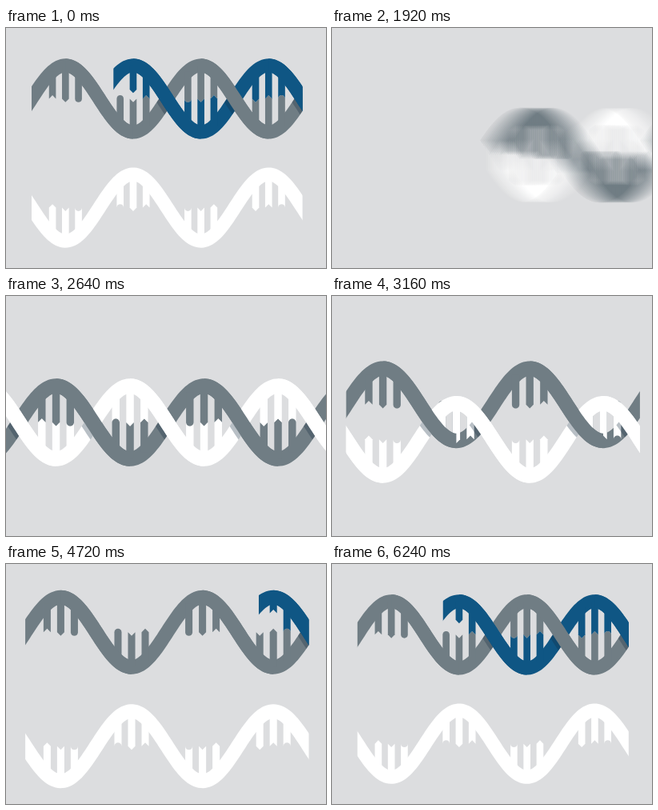
An HTML page with a canvas that plays this animation: 400x300 px, repeating every 6.28 s.

```html
<!DOCTYPE html>
<html lang="en">
<head>
<meta charset="utf-8">
<title>Helix</title>
<style>
  html, body { margin: 0; width: 100%; height: 100%; overflow: hidden; background: #dcdddf; }
  canvas { display: block; width: 400px; height: 300px; }
</style>
</head>
<body>
<canvas id="stage" width="400" height="300"></canvas>
<script>
const W = 400, H = 300, LOOP = 6280, CUT = 1760, CX = 201.3;
const BG = '#dcdddf', GRAY = '#707d84', WHITE = '#ffffff', BLUE = '#0f5684';
const SHADE = 'rgba(20,45,65,.3)';
// tips of the three rungs in four lobes: n notch, p point, r round
const TIPS = 'nprrnprpnnpr';
// wave length over time
const PERIOD = [
  [1760, 204.5], [1920, 200], [2120, 194.2], [2320, 189.6], [2640, 185], [3040, 184],
  [3480, 182.6], [4320, 179.3], [4720, 177.2], [4960, 176], [5600, 173],
  [6280, 169.3], [6960, 166.9], [7600, 165.5], [7800, 165.4]
];

const stage = document.getElementById('stage').getContext('2d');
const layer = document.createElement('canvas');
layer.width = W;
layer.height = H;
const sheet = layer.getContext('2d');

const clamp = v => Math.max(0, Math.min(1, v));
const lerp = (a, b, k) => a + (b - a) * k;
const ease = k => k * k * (3 - 2 * k);

function lookup(table, t) {
  const i = table.findIndex(p => p[0] > t);
  if (i < 0) return table[table.length - 1][1];
  if (i === 0) return table[0][1];
  const [a, b] = [table[i - 1], table[i]];
  return lerp(a[1], b[1], (t - a[0]) / (b[0] - a[0]));
}

function waveY(s, x) {
  return s.mid - s.sign * 0.246 * s.period * Math.sin(2 * Math.PI * (x - s.origin) / s.period);
}

// outline of the band between two x positions
function band(s, from, to, dx = 0) {
  const path = new Path2D(), low = [], half = 0.05 * s.period;
  const k = 2 * Math.PI / s.period;
  for (let x = from; x <= to + 2; x += 2) {
    const y = waveY(s, x);
    const slope = -s.sign * 0.246 * 2 * Math.PI * Math.cos(k * (x - s.origin));
    const len = Math.hypot(1, slope);
    const nx = -slope / len * half, ny = half / len;
    path.lineTo(x - nx + dx, y - ny);
    low.push([x + nx + dx, y + ny]);
  }
  low.reverse().forEach(p => path.lineTo(p[0], p[1]));
  path.closePath();
  return path;
}

function clipX(c, from, to) {
  c.beginPath();
  c.rect(from, 0, Math.max(0, to - from), H);
  c.clip();
}

function rung(c, s, x, down, kind) {
  const half = 0.0255 * s.period;
  const grow = s.front === undefined ? 1
    : clamp((x - s.front - 0.03 * s.period) / (0.16 * s.period));
  if (grow <= 0) return;
  const top = waveY(s, x), end = lerp(top, s.mid, grow);
  const tip = 0.026 * s.period * down * s.sign * (kind === 'n' ? -1 : 1);
  c.beginPath();
  c.moveTo(x - half, top);
  c.lineTo(x - half, end);
  if (kind === 'r') c.bezierCurveTo(x - half, end + tip * 1.33, x + half, end + tip * 1.33, x + half, end);
  else c.lineTo(x, end + tip);
  c.lineTo(x + half, end);
  c.lineTo(x + half, top);
  c.fill();
}

function strand(c, s) {
  c.save();
  clipX(c, s.from, s.to);
  c.fillStyle = s.color;
  c.fill(band(s, s.from - 20, s.to + 20));
  const first = Math.floor(2 * (s.from - s.origin) / s.period) - 1;
  const last = Math.ceil(2 * (s.to - s.origin) / s.period);
  for (let n = first; n <= last; n++) {
    const peak = s.origin + s.period * (0.25 + 0.5 * n);
    const down = (n % 2 === 0 ? 1 : -1) * s.sign;
    const lobe = ((n % 4) + 4) % 4;
    for (let j = 0; j < 3; j++)
      rung(c, s, peak + (j - 1) * 0.096 * s.period, down, TIPS[lobe * 3 + j]);
  }
  c.restore();
}

// the falling part of each band passes over the rising part of the other
function helix(c, a, b) {
  strand(c, a);
  strand(c, b);
  const first = Math.floor(2 * (a.from - a.origin) / a.period) - 1;
  const last = Math.ceil(2 * (a.to - a.origin) / a.period) + 1;
  for (let n = first; n <= last; n++) {
    const x = a.origin + n * a.period / 2, q = a.period / 4;
    const over = n % 2 ? a : b, under = n % 2 ? b : a;
    c.save();
    clipX(c, Math.max(x - q, over.from), Math.min(x + q, over.to));
    c.save();
    clipX(c, under.from, under.to);
    c.clip(band(under, x - q, x + q));
    c.fillStyle = SHADE;
    c.fill(band(over, x - q - 4, x + q + 12, -0.034 * a.period));
    c.restore();
    c.fillStyle = over.color;
    c.fill(band(over, x - q - 4, x + q + 4));
    c.restore();
  }
}

function clear(c) {
  c.fillStyle = BG;
  c.fillRect(0, 0, W, H);
}

function make(sign, color, mid, period, origin, from, to, front) {
  return { sign, color, mid, period, origin, from, to, front };
}

function slideX(t) {
  return -354 + 561 * Math.pow(Math.max(0, 2640 - t) / 720, 1.74);
}

function slideIn(t) {
  const period = lookup(PERIOD, t);
  const mid = 158 + clamp((2640 - t) / 720);
  const blur = slideX(t - 16) - slideX(t + 16);
  const count = Math.max(1, Math.min(18, Math.ceil(blur / 2)));
  for (let i = 0; i < count; i++) {
    const x = slideX(t) + ((i + 0.5) / count - 0.5) * blur;
    const from = Math.max(x, -10);
    clear(sheet);
    if (x < W) helix(sheet,
      make(1, GRAY, mid, period, x, from, W + 10),
      make(-1, WHITE, mid, period, x, from, W + 10));
    stage.globalAlpha = 1 / (i + 1);
    stage.drawImage(layer, 0, 0);
  }
  stage.globalAlpha = 1;
}

function split(t) {
  const period = lookup(PERIOD, t), left = CX - period, right = CX + period;
  const crop = ease(clamp((t - 2700) / 300));
  const from = lerp(-2, left, crop), to = lerp(W + 2, right, crop);
  const apart = ease(clamp((t - 3010) / 420));
  const high = lerp(158, 156.5 - 0.402 * period, apart);
  const low = lerp(158, 156.5 + 0.402 * period, apart);
  const gray = make(1, GRAY, high, period, left, from, to);
  const white = make(-1, WHITE, low, period, left, from, to);
  if (apart < 1) return helix(stage, gray, white);
  strand(stage, white);
  const u = 1 - (t - 4193) / 2992;
  if (u >= 1) return strand(stage, gray);
  const front = left + 2 * period * u;
  helix(stage, gray,
    make(-1, BLUE, high, period, left, Math.max(left, front), right, front));
}

function draw(now) {
  const time = now % LOOP;
  const t = time < CUT ? time + LOOP : time;
  clear(stage);
  if (t < 2640) slideIn(t);
  else split(t);
}

function tick() {
  draw(performance.now());
  requestAnimationFrame(tick);
}
tick();
</script>
</body>
</html>
```
